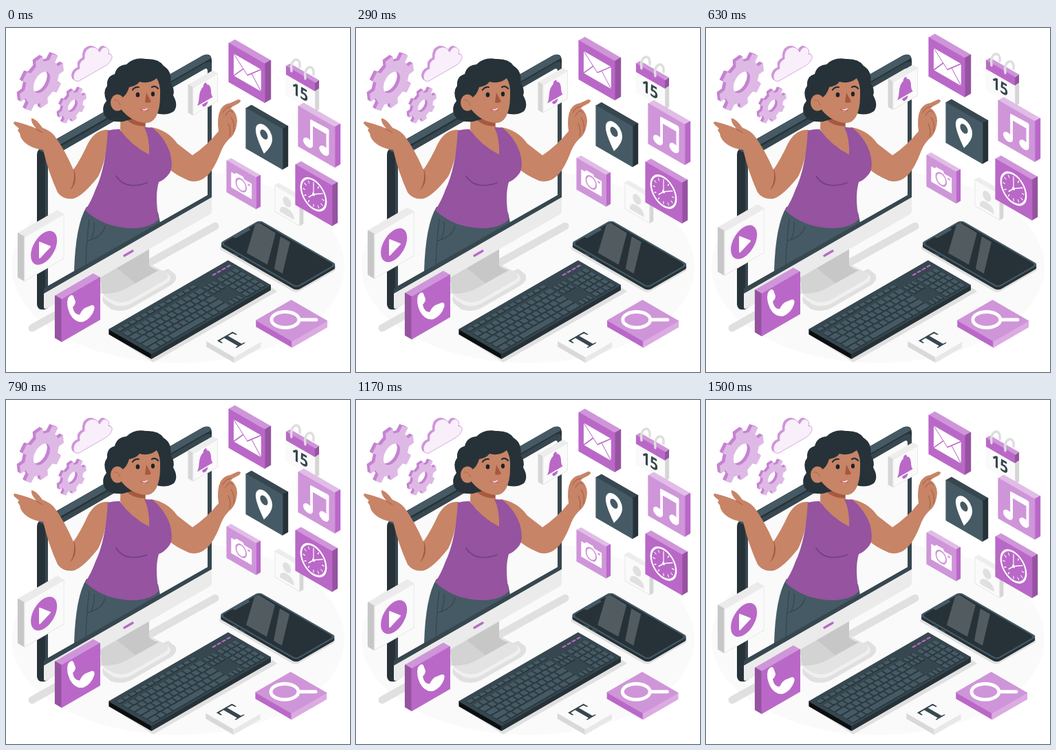
An HTML page for the animation above (1.54 s loop, 500 by 500 pixels).

```html
<!DOCTYPE html>
<html lang="en">
<head>
<meta charset="utf-8">
<title>Desktop icons</title>
<style>
  html, body { margin: 0; height: 100%; overflow: hidden; background: #fff; }
  svg { display: block; width: 100%; height: 100%; }
</style>
</head>
<body>
<svg id="stage" viewBox="0 0 500 500"></svg>
<script>
const C = .866, S = .5;
const purple = '#ba68c8', plum = '#9553a0', lilac = '#cf95d9', pale = '#e0bde6';
const ink = '#263238', slate = '#37474f', steel = '#455a64';
const skin = '#c78467', skinDark = '#a5593f';

const path = (d, fill, extra = '') => `<path d="${d}" fill="${fill}" ${extra}/>`;
const line = (d, stroke, width, extra = '') =>
  `<path d="${d}" fill="none" stroke="${stroke}" stroke-width="${width}" stroke-linecap="round" stroke-linejoin="round" ${extra}/>`;
const poly = (points, fill) =>
  `<polygon points="${points.map(p => p.map(n => n.toFixed(1))).join(' ')}" fill="${fill}" stroke="${fill}" stroke-width="1.2" stroke-linejoin="round"/>`;
const add = (...vs) => vs.reduce((a, b) => [a[0] + b[0], a[1] + b[1]]);
const plane = (x, y, ax, ay, bx, by, body) =>
  `<g transform="matrix(${ax} ${ay} ${bx} ${by} ${x} ${y})">${body}</g>`;
const flat = (x, y, body) => plane(x, y, C, -S, C, S, body);

// Upright slab; dir 1 shows its right side, -1 its left side. The glyph lies on the front face.
function card(x, y, w, h, depth, dir, [front, side, top], glyph = '') {
  const p = [x, y], a = [C * w, dir * S * w], v = [dir * C * depth, -S * depth], down = [0, h];
  const edge = dir > 0 ? add(p, a) : p;
  return poly([p, add(p, a), add(p, a, v), add(p, v)], top)
    + poly([edge, add(edge, v), add(edge, v, down), add(edge, down)], side)
    + poly([p, add(p, a), add(p, a, down), add(p, down)], front)
    + plane(x, y, C, dir * S, 0, 1, glyph);
}

// Lying slab, given by its left corner.
function tile(x, y, u, v, depth, [top, left, right]) {
  const p = [x, y], a = [C * u, -S * u], b = [C * v, S * v], down = [0, depth];
  const low = add(p, b), far = add(p, a, b);
  return poly([p, low, add(low, down), add(p, down)], left)
    + poly([low, far, add(far, down), add(low, down)], right)
    + poly([p, add(p, a), far, low], top);
}

function gear(x, y, r, hole, depth) {
  const teeth = 8;
  let d = '';
  for (let i = 0; i < teeth; i++)
    [[-.28, .78], [-.21, 1], [.21, 1], [.28, .78]].forEach(([k, f], j) => {
      const t = (i + k) / teeth * 2 * Math.PI - .12;
      d += `${i + j ? 'L' : 'M'}${(r * f * Math.cos(t)).toFixed(1)} ${(r * f * Math.sin(t)).toFixed(1)}`;
    });
  d += `ZM${hole} 0A${hole} ${hole} 0 1 0 ${-hole} 0A${hole} ${hole} 0 1 0 ${hole} 0Z`;
  let out = '';
  for (let k = depth; k >= 0; k--)
    out += plane(x - k * C, y - k * S, C, -S, 0, 1,
      path(d, k ? '#c583d1' : '#dfb9e6', 'fill-rule="evenodd"'));
  return out;
}

function cloud() {
  const d = 'M106 77Q98 79 98 70Q99 62 107 59Q105 49 114 45Q113 33 121 29Q131 25 136 35Q141 25 147 29Q151 32 149 38Q155 37 154 44Q152 50 146 54Z';
  return path(d, lilac, 'transform="translate(-3 -2)"') + path(d, lilac, 'transform="translate(-1.5 -1)"')
    + path(d, '#f8effa', `stroke="${lilac}" stroke-width=".8"`);
}

function floor() {
  return '<ellipse cx="250" cy="347" rx="242" ry="140" fill="#fafafa"/>'
    + line('M38 436L304 288', '#e0e0e0', 11)
    + path('M143 388Q138 392 142 400L153 409Q168 414 182 407L241 373Q250 366 246 358L236 350Z', '#e0e0e0')
    + path('M144 382Q137 388 145 395L156 402Q169 407 181 401L235 370Q243 364 235 357L212 345Z', '#f0f0f0')
    + path('M144 380Q138 386 146 391L157 397Q169 401 180 396L232 366Q239 361 232 355L212 345Z', '#e3e3e3')
    + path('M136 362L208 320V345Q214 351 222 352L176 378Q160 387 140 386Z', '#d3d3d3')
    + path('M160 348L208 320V345Q212 350 222 352L188 371Z', '#c7c7c7');
}

function monitor() {
  return path('M45 184Q45 178 51 174L286 40Q299 35 299 48V246L57 409Q46 411 45 402Z', ink)
    + path('M47 177L286 40Q296 37 298 44L57 182Z', steel)
    + path('M57 193Q57 185 64 181L289 51Q299 46 299 55V247L57 388Z', slate)
    + path('M61 197Q61 191 66 188L288 60Q293 57 293 63V243L61 375Z', '#fafafa');
}

function chin() {
  return path('M55 379L61 375L293 243L299 239V250L55 390Z', slate)
    + path('M55 386L299 246V266Q299 269 296 271L60 407Q55 410 55 405Z', '#ebebeb')
    + line('M172 331L184 324', purple, 3.4);
}

function woman() {
  return path('M117 260Q101 286 99 354L224 283L221 268Z', steel)
    + line('M144 288Q140 304 119 309M121 278Q117 310 116 344M128 282Q130 292 124 307', slate, 1.3)
    // arms
    + path('M149 148Q130 147 119 168Q109 190 98 206Q85 176 70 156Q64 149 53 145Q44 132 37 131Q36 138 44 146Q27 139 13 136Q9 137 13 141L19 146Q15 148 20 153Q21 163 32 170Q42 176 54 177Q61 208 75 239Q83 250 98 248Q112 244 134 216Q147 190 149 148Z', skin)
    + path('M98 203Q102 222 93 236Q106 224 98 203Z', skinDark)
    + line('M44 147L53 152', skinDark, 1)
    + path('M210 144Q235 148 249 168L271 185Q292 171 309 150Q306 130 312 118Q317 110 326 109L337 104Q344 104 339 109L326 116Q336 123 336 135Q335 150 328 158Q318 166 313 178Q303 205 292 215Q280 226 266 222Q245 213 235 203Z', skin)
    + line('M315 123Q321 112 328 115M319 127Q325 116 330 123M323 139Q328 149 325 157M327 130Q333 137 331 151', skinDark, 1)
    // neck and top
    + path('M167 118L166 147Q180 180 211 187Q211 158 203 145L202 130Z', skin)
    + path('M174 132Q184 143 202 143L203 137L180 122Z', skinDark)
    + path('M148 149Q156 147 165 147Q182 171 208 184Q209 160 201 144L213 145Q231 160 238 180Q244 203 237 212Q230 221 222 224Q216 244 222 278Q212 289 189 291Q144 292 115 265Q124 252 130 235Q145 204 148 149Z', plum)
    + line('M160 215Q173 236 205 225', '#73407c', 1.6)
    // head
    + path('M170 136Q150 138 143 127Q138 115 146 106Q140 93 147 84Q146 70 158 67Q161 54 175 53Q186 42 203 45Q222 44 229 55Q242 63 239 80Q246 89 243 98Q251 112 244 121Q232 129 216 123Z', ink)
    + path('M168 102Q176 97 179 86Q190 84 194 78Q208 82 219 73Q225 82 224 99Q224 118 218 129Q212 139 202 138Q182 136 168 119Z', skin)
    + `<ellipse cx="162" cy="108.500" rx="10" ry="12" fill="${skin}"/>`
    + line('M157 105Q163 103 166 112', skinDark, .7)
    + path('M204 94L211 107Q207 110 202 108Z', skinDark)
    + '<ellipse cx="191.500" cy="97" rx="2.800" ry="3.500" fill="#1c2327"/><ellipse cx="213.500" cy="96" rx="2.600" ry="3.400" fill="#1c2327"/>'
    + line('M184 90Q187 85 193 86M212 86Q217 83 221 88', ink, 2.2)
    + path('M196 118Q202 119 206 116Q205 122 200 122Z', '#f3d9d6')
    + line('M196 118Q201 123 206 119', '#c7545a', 1.3);
}

function keyboard() {
  const key = (u, v, w, h) =>
    `<rect x="${u}" y="${v}" width="${w - .8}" height="${h}" rx="1" fill="${ink}"/>`
    + `<rect x="${u + 1}" y="${v}" width="${w - 2.2}" height="${h - 1.6}" rx="1" fill="${steel}"/>`;
  const row = (u, v, h, widths) => widths.map(w => { const k = key(u, v, w, h); u += w; return k; }).join('');
  const same = (n, w) => Array(n).fill(w);
  const main = [[...same(12, 10), 12], [14, ...same(11, 10), 8], [17, ...same(10, 10), 15], [22, ...same(9, 10), 20], [14, 10, 11, 56, 11, 11, 19]];
  let keys = row(5, 6, 7, same(13, 10.15));
  main.forEach((widths, i) => {
    const v = 17 + i * 10.5;
    keys += row(5, v, 9.7, widths) + row(162, v, 9.7, same(4, 8.5));
    if (i < 2 || i > 3) keys += row(139, v, 9.7, same(3, 6.7));
  });
  for (let i = 0; i < 4; i++) keys += `<rect x="${165 + i * 8}" y="7" width="6" height="2.600" fill="${purple}"/>`;
  return path('M154 448L214 486L394 383L382 374Z', '#e0e0e0')
    + tile(150, 438, 199.5, 71, 7, [slate, '#0b0f11', ink]) + flat(150, 438, keys);
}

function tablet() {
  const slab = (y, fill) => flat(310, y, `<rect width="68" height="130" rx="6" fill="${fill}"/>`);
  return flat(308, 320, '<rect width="70" height="131" rx="6" fill="#e0e0e0"/>')
    + slab(317, ink) + slab(315, ink) + slab(313, steel)
    + flat(310, 313, `<rect x="2.500" y="2.500" width="63" height="125" rx="5" fill="${ink}"/>`
      + `<rect x="21" y="1.500" width="26" height="5" rx="2" fill="${steel}"/>`)
    + path('M362 286L368 283L392 298L380 344L350 327Z', '#fff', 'opacity=".2"')
    + path('M399 303L413 311L402 357L390 350Z', '#fff', 'opacity=".2"')
    + line('M331 328L337 331M342 334L347 337', steel, 1.6);
}

function search() {
  return tile(364, 425, 58.5, 60, 9, [lilac, purple, '#dbabe2'])
    + '<ellipse cx="406" cy="424" rx="20" ry="11.500" fill="none" stroke="#fff" stroke-width="5"/>'
    + line('M428 424L451 424', '#fff', 5);
}

function letter() {
  return tile(292, 455, 44, 46, 8, ['#fafafa', '#d9d9d9', '#e8e8e8'])
    + flat(292, 454, `<text x="21" y="36" text-anchor="middle" font-family="Liberation Serif, serif" font-weight="700" font-size="41" fill="${slate}">T</text>`);
}

function calendar() {
  const ring = (x, y) => line(`M${x} ${y + 17}Q${x - 2} ${y + 3} ${x + 6} ${y}Q${x + 13} ${y} ${x + 12} ${y + 11}`, '#dedede', 3.4);
  return card(407, 56, 48, 42, 7, 1, ['#fafafa', '#d6d6d6', lilac],
      `<rect y="-1" width="48.500" height="13" fill="${purple}"/>`
      + `<text x="23.500" y="34" text-anchor="middle" font-family="Open Sans, sans-serif" font-weight="700" font-size="24" fill="${slate}">15</text>`)
    + path('M449 80L455 76V88L449 92Z', plum)
    + ring(415, 46) + ring(435, 57);
}

function clockGlyph() {
  let ticks = '';
  for (let i = 0; i < 12; i++) ticks += `<path d="M30 10V14" stroke="#fff" stroke-width="1.300" transform="rotate(${i * 30} 30 28)"/>`;
  return '<circle cx="30" cy="28" r="21" fill="none" stroke="#fff" stroke-width="2.800"/>' + ticks
    + line('M30 14V28L42 21M30 28L22 36', '#fff', 1.4) + '<circle cx="30" cy="28" r="2.200" fill="#fff"/>';
}

function icons() {
  const vivid = [purple, plum, lilac], soft = [lilac, purple, pale], white = ['#fafafa', '#d6d6d6', '#ededed'];
  const outline = (w, h) => `<rect width="${w}" height="${h}" fill="none" stroke="#e3e3e3" stroke-width=".9"/>`;
  const envelope = '<rect x="8" y="11" width="46" height="32" fill="#fff"/>'
    + line('M8 11L31 31L54 11M8 43L24 25M54 43L38 25', purple, 1.3);
  const pin = path('M30 51Q16 33 16 23A14 14 0 0 1 44 23Q44 33 30 51ZM36.500 23A6.500 6.500 0 1 0 23.500 23A6.500 6.500 0 1 0 36.500 23Z', '#fff', 'fill-rule="evenodd"');
  const music = line('M22 45V11L49 10V43', '#fff', 4.5) + path('M20 9H51V17H20Z', '#fff')
    + '<ellipse cx="16" cy="45" rx="8" ry="6.500" fill="#fff"/><ellipse cx="43" cy="43" rx="8" ry="6.500" fill="#fff"/>';
  const camera = path('M8 13H14L16 10H27L29 13H41V34H8Z', '#fff', 'stroke="#fff" stroke-width="1.500" stroke-linejoin="round"')
    + `<circle cx="24" cy="23" r="8.500" fill="#fff" stroke="${lilac}" stroke-width="2.200"/><rect x="35" y="15" width="4" height="2.500" fill="${lilac}"/>`;
  const bell = path('M20 3Q23 3 23 7Q29 9 30 19Q30 26 33 30H7Q10 26 10 19Q11 9 17 7Q17 3 20 3ZM15 32H25Q24 37 20 37Q16 37 15 32Z', purple);
  const person = '<circle cx="20" cy="14" r="7" fill="#e0e0e0"/>' + path('M8 34Q8 23 20 23Q32 23 32 34Z', '#e0e0e0');
  return card(272, 87, 41, 40, 8, -1, white, outline(41, 40) + bell)
    + card(324, 22.5, 60, 56, 10, 1, vivid, envelope)
    + calendar()
    + card(349, 117, 61, 58, 9, 1, [steel, ink, slate], pin)
    + card(425, 114, 61, 58, 9, 1, soft, music)
    + card(321, 193.5, 49, 45, 7, 1, soft, camera)
    + card(391, 229, 41, 38, 6, 1, white, outline(41, 38) + person)
    + card(421, 199, 61, 58, 9, 1, vivid, clockGlyph())
    + card(27, 304, 66, 64, 11, -1, ['#fafafa', '#c7c7c7', '#ebebeb'],
      outline(66, 64) + `<circle cx="32.500" cy="32" r="22" fill="${purple}"/>`)
    + path('M49 312L64 318L49 334Z', '#fff', 'stroke="#fff" stroke-width="2" stroke-linejoin="round"')
    + card(81, 395, 64, 61, 11, -1, vivid)
    + path('M90 393Q95 386 98 390L101 398Q101 402 97 406Q99 417 107 417Q111 409 115 407L125 403Q130 403 128 410Q124 422 113 427Q101 430 93 416Q87 403 90 393Z', '#fff');
}

document.getElementById('stage').innerHTML = floor()
  + gear(52, 79, 37, 14, 5) + gear(97, 113, 23, 8, 4) + cloud()
  + monitor() + woman() + chin() + keyboard()
  + `<g id="shake">${tablet() + search() + letter()}</g><g id="float">${icons()}</g>`;

const LOOP = 1540, CYCLE = 1500, FPS = 24;
const shakeX = [0, -1, 2, -4, 4, -4, 4, -4, 2, -1, 0];
const shake = document.getElementById('shake'), float = document.getElementById('float');

function draw(now) {
  const step = Math.floor((now % LOOP + 5) * FPS / 1000);
  const p = (step * 1000 / FPS + 15) % CYCLE / CYCLE;
  const i = Math.floor(p * 10), x = shakeX[i] + (shakeX[i + 1] - shakeX[i]) * (p * 10 - i);
  const y = -10 * (1 - Math.abs(1 - 2 * p));
  shake.setAttribute('transform', `translate(${x.toFixed(2)} 0)`);
  float.setAttribute('transform', `translate(0 ${y.toFixed(2)})`);
}

const start = performance.now();
function tick() {
  draw(performance.now() - start);
  requestAnimationFrame(tick);
}
tick();
</script>
</body>
</html>
```
